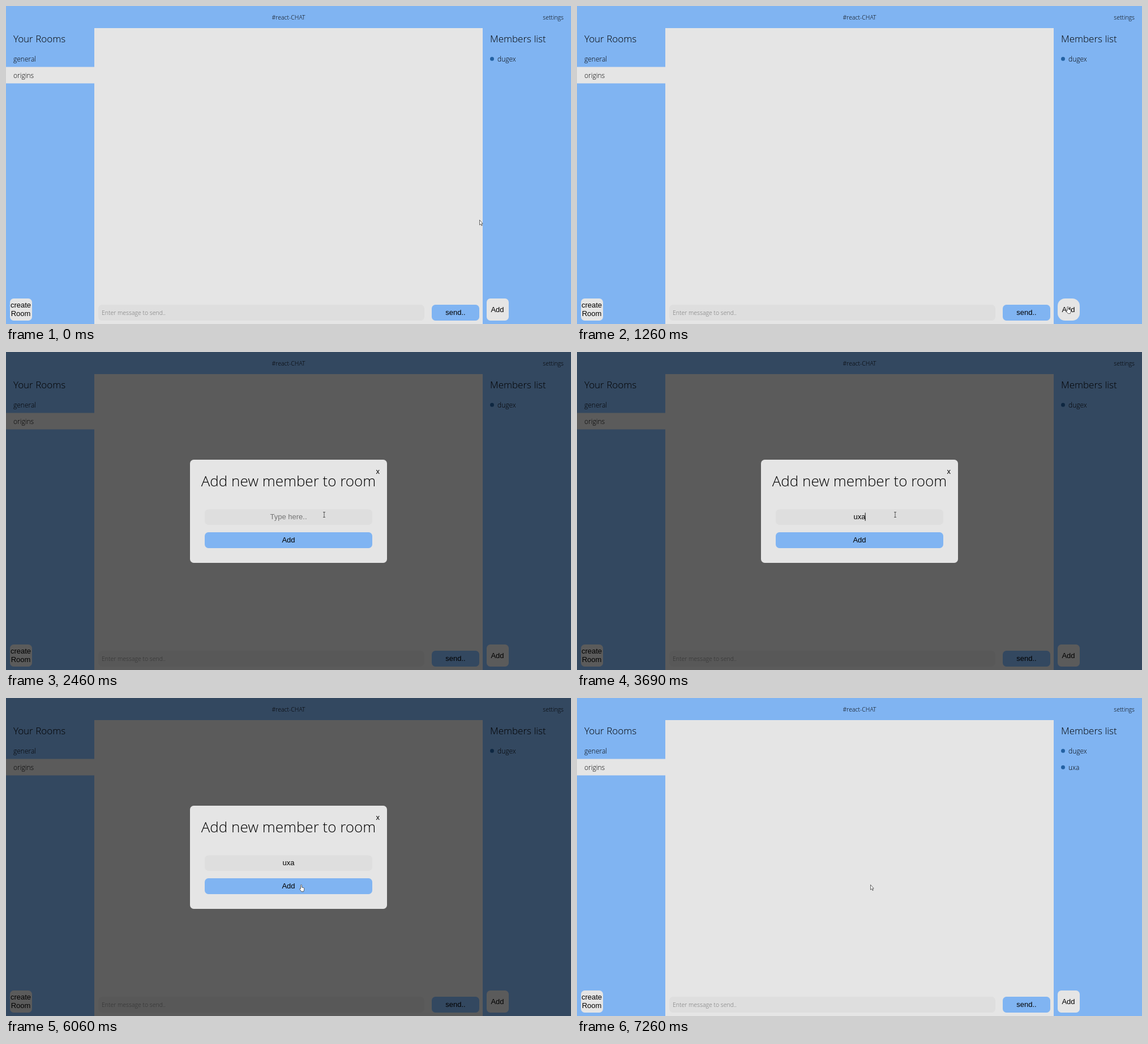
Animation of 998x561 px, one loop 7.41 s. Source, as an HTML page:

```html
<!DOCTYPE html>
<html lang="en">
<head>
<meta charset="utf-8">
<title>Chat room</title>
<style>
  html, body { margin: 0; width: 100%; height: 100%; overflow: hidden; background: #80b4f2; }
  svg { display: block; width: 100%; height: 100%; }
  text { font: 300 10.5px "Open Sans", sans-serif; white-space: pre; }
  .heading { font-size: 17px; }
  .item { font-size: 12px; }
  .title { font-size: 26px; }
  .control { font: 400 13px "Liberation Sans", Arial, sans-serif; }
  .hint { fill: #757575; }
  .mid { text-anchor: middle; }
  .end { text-anchor: end; }
  .blue { fill: #80b4f2; }
  .pale { fill: #e5e5e5; }
  .field { fill: #dedede; }
  .dot { fill: #2462a3; }
  .pointer { fill: #fff; stroke: #333; stroke-width: .75; stroke-linejoin: round; }
</style>
</head>
<body>
<svg viewBox="0 0 998 561">
  <rect class="blue" width="998" height="561"/>
  <rect class="pale" x="156" y="39" width="686" height="522"/>
  <text class="mid" x="499" y="23.5">#react-CHAT</text>
  <text class="end" x="985" y="23.5">settings</text>

  <text class="heading" x="13" y="64">Your Rooms</text>
  <rect class="pale" y="107.5" width="156" height="29"/>
  <text class="item" x="13" y="97.5">general</text>
  <text class="item" x="13" y="126.5">origins</text>
  <rect class="pale" x="7" y="516" width="39" height="39" rx="6.5"/>
  <text class="control mid" x="26" y="532">create</text>
  <text class="control mid" x="26" y="547">Room</text>

  <text class="heading" x="855" y="64">Members list</text>
  <circle class="dot" cx="858.5" cy="93.3" r="3.5"/>
  <text class="item" x="868" y="97.5">dugex</text>
  <g id="newMember">
    <circle class="dot" cx="858.5" cy="122.3" r="3.5"/>
    <text class="item" x="868" y="126.5">uxa</text>
  </g>
  <rect id="addButton" class="pale" x="849" y="516" width="39" height="39"/>
  <text class="control mid" x="868" y="540">Add</text>

  <rect class="field" x="163" y="527" width="576" height="28" rx="6.5"/>
  <text class="hint" x="169" y="544.5">Enter message to send..</text>
  <rect class="blue" x="752" y="527" width="84" height="28" rx="6.5"/>
  <text class="control mid" x="794" y="545">send..</text>

  <g id="modal">
    <rect width="998" height="561" opacity=".6"/>
    <rect class="pale" x="325" y="190" width="348" height="182" rx="6.5"/>
    <text class="control mid" x="656.7" y="215">x</text>
    <text class="title mid" x="499" y="236.5">Add new member to room</text>
    <rect class="field" x="351" y="277.5" width="296" height="27.5" rx="6.5"/>
    <text id="entry" class="control mid" x="499" y="295"></text>
    <rect id="caret" y="283.5" width=".9" height="14.5"/>
    <rect class="blue" x="351" y="318" width="296" height="28" rx="6.5"/>
    <text class="control mid" x="499" y="336">Add</text>
  </g>

  <g id="cursor">
    <path id="arrow" class="pointer" d="M.5 .5V9.3L2.5 7.5 4 10.6 5.3 10 3.9 7H6.2Z"/>
    <path id="hand" class="pointer" d="M2.5 7.5V1.5a1 1 0 0 1 2 0V5l3.3.8q1.1.3 1 1.4l-.3 2.6-.9 2.8H3.9L.8 8.4q-.5-1 .4-1.3z"/>
    <path id="beam" fill="none" stroke="#333" stroke-width=".8" d="M-2-4.5H2M-2 4.5H2M0-4.5V4.5"/>
  </g>
</svg>
<script>
const LOOP = 7410, OPEN = 1620, CLOSE = 6180, JOINED = 7260;
const $ = id => document.getElementById(id);
const [newMember, addButton, modal, entry, caret, cursor, arrow, hand, beam] =
  ["newMember", "addButton", "modal", "entry", "caret", "cursor", "arrow", "hand", "beam"].map($);

// Pointer moves: start, end, destination
const start = [836, 377];
const moves = [
  [0, 420, [857, 464]],
  [600, 1230, [863.5, 530]],
  [1620, 2130, [560.5, 286.5]],
  [2370, 2460, [562, 287]],
  [4410, 5130, [518, 329]]
];
const typed = [[3390, "u"], [3600, "ux"], [3690, "uxa"]];
const caretOn = [[2670, 3150], [3390, 4170], [4680, 5130], [5580, 6060]];

const clamp = v => Math.min(1, Math.max(0, v));
const ease = v => v * v * (3 - 2 * v);
const within = (t, [from, to]) => t >= from && t < to;
const show = (node, on) => node.setAttribute("display", on ? "inline" : "none");

function pointerAt(t) {
  return moves.reduce((pos, [from, to, dest]) => {
    const k = ease(clamp((t - from) / (to - from)));
    return pos.map((v, i) => v + (dest[i] - v) * k);
  }, start);
}

function cursorKind(x, y, open) {
  if (!open) return x > 849 && x < 888 && y > 516 && y < 555 ? hand : arrow;
  if (x < 351 || x > 647) return arrow;
  if (y > 277 && y < 305) return beam;
  return y > 318 && y < 346 ? hand : arrow;
}

function render(t) {
  const open = within(t, [OPEN, CLOSE]);
  show(modal, open);
  show(newMember, t >= JOINED);

  const hover = clamp((t - 1020) / 200) - clamp((t - 1650) / 200);
  addButton.setAttribute("rx", 6.5 + 6.5 * hover);

  const value = typed.reduce((text, [at, next]) => t >= at ? next : text, "");
  entry.textContent = value || "Type here..";
  entry.classList.toggle("hint", !value);
  show(caret, caretOn.some(span => within(t, span)));
  caret.setAttribute("x", open && value ? 498.2 + entry.getComputedTextLength() / 2 : 499.2);

  const [x, y] = pointerAt(t);
  const kind = cursorKind(x, y, open);
  [arrow, hand, beam].forEach(node => show(node, node === kind));
  cursor.setAttribute("transform", `translate(${x} ${y})`);
}

const began = performance.now();
function tick() {
  render((performance.now() - began) % LOOP);
  requestAnimationFrame(tick);
}
tick();
</script>
</body>
</html>
```
